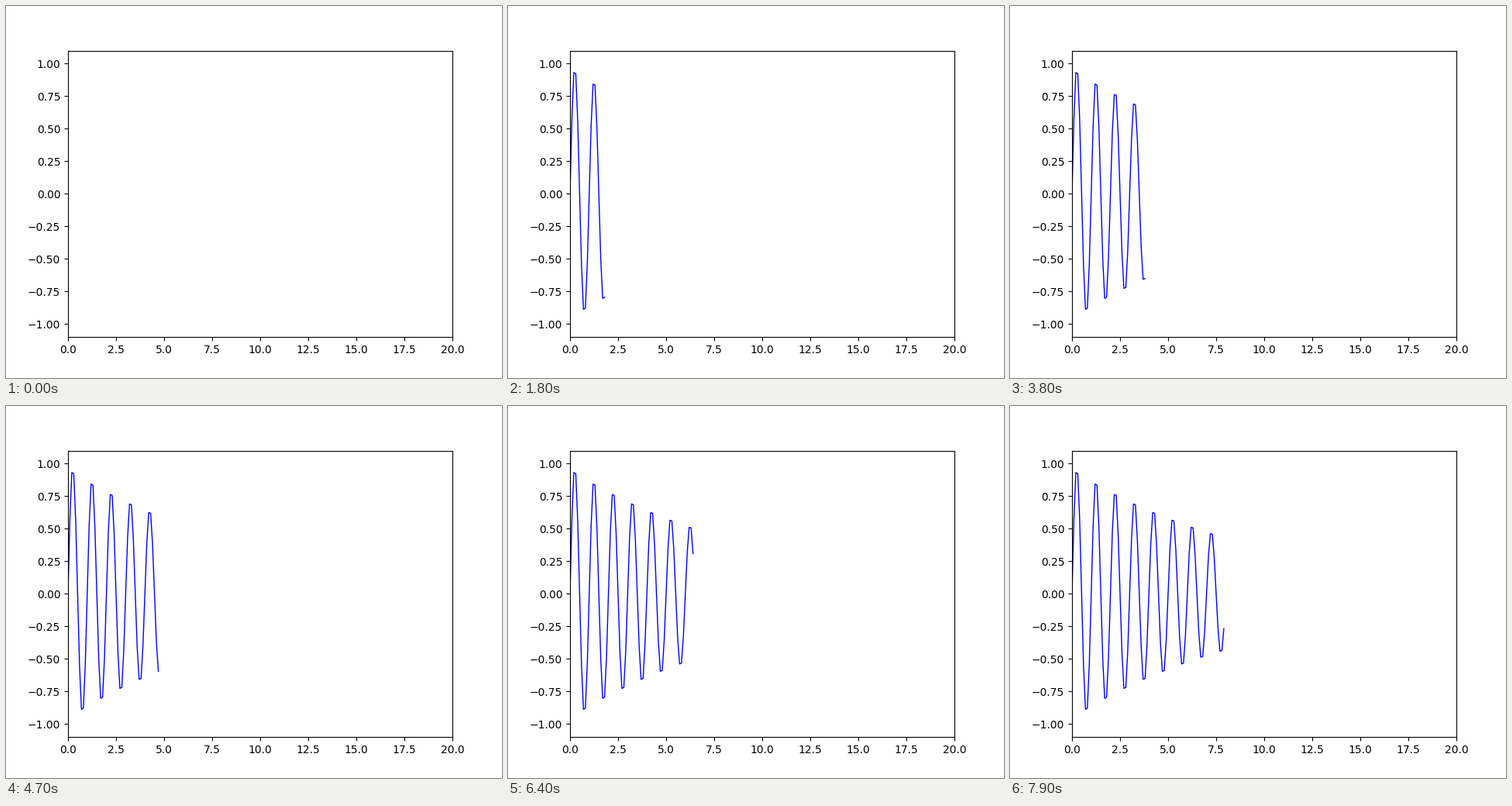
Recreate the animation shown at these times as a matplotlib script. Size 640 by 480 pixels, loop 8000 ms.

```python
import matplotlib.pyplot as plt
import numpy as np
from matplotlib.animation import FuncAnimation

FRAMES = 80
INTERVAL = 100  # ms
STEP = 0.1      # time gained per frame

fig, ax = plt.subplots(figsize=(6.4, 4.8), dpi=100)
ax.set_xlim(0, 20)
ax.set_ylim(-1.1, 1.1)
line, = ax.plot([], [], color="blue", lw=1)


def decay(t):
    """Damped sine wave."""
    return np.sin(2 * np.pi * t) * np.exp(-t / 10)


def init():
    line.set_data([], [])
    return line,


def update(i):
    t = np.arange(i + 1) * STEP
    line.set_data(t, decay(t))
    return line,


anim = FuncAnimation(fig, update, frames=FRAMES, init_func=init,
                     interval=INTERVAL, repeat=True, repeat_delay=0)
plt.show()
```
